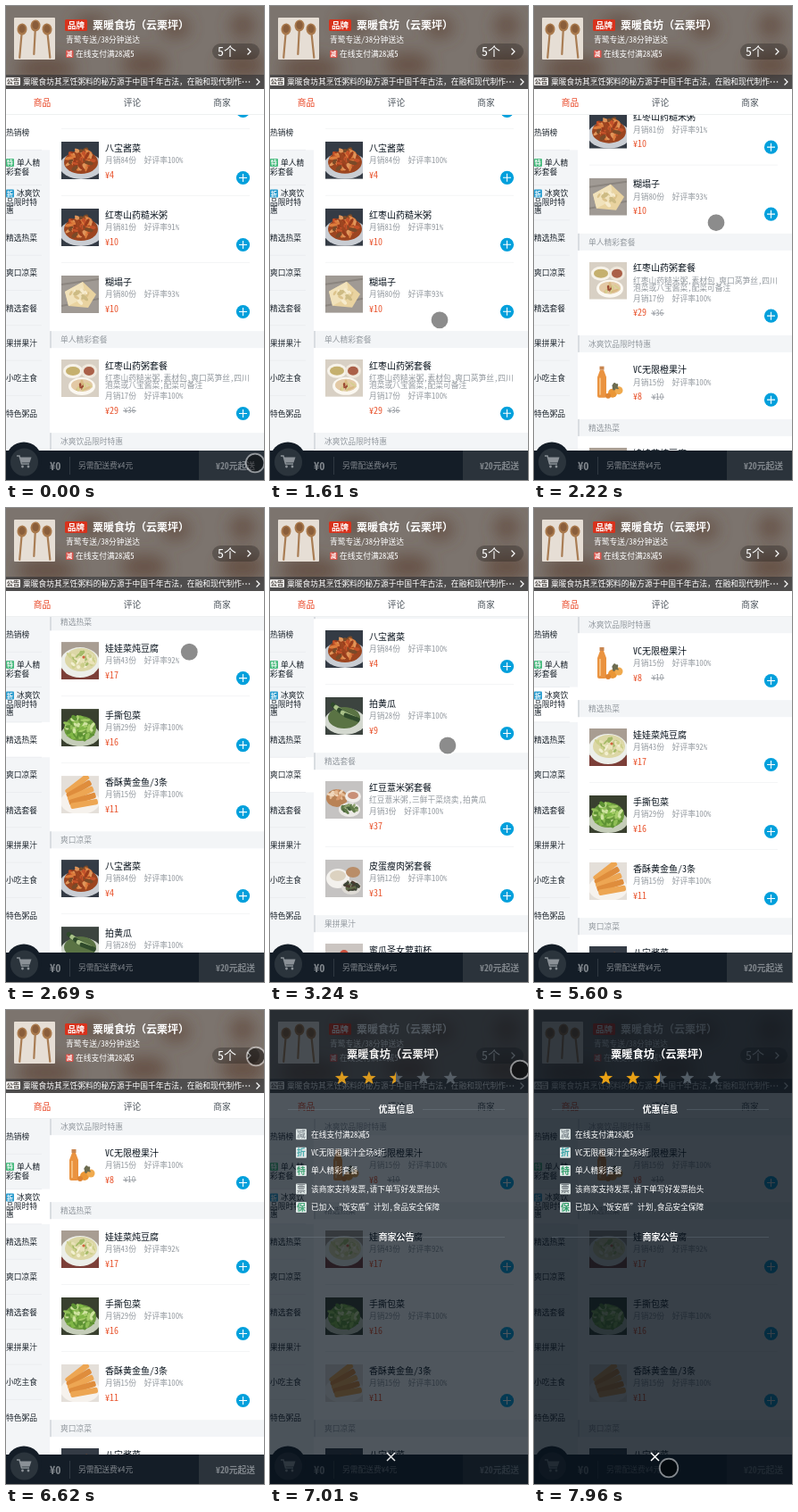
An HTML page for the animation above (8 s loop, 289 by 531 pixels).

```html
<!DOCTYPE html>
<html lang="zh">
<head>
<meta charset="utf-8">
<title>外卖点餐</title>
<style>
html, body { margin: 0; width: 100%; height: 100%; overflow: hidden; background: #fff; }
svg { display: block; }
text { white-space: pre; font-family: "Noto Sans Mono CJK SC", "Noto Sans CJK SC", "Noto Sans CJK", sans-serif; }
</style>
</head>
<body>
<svg id="stage" width="289" height="531" viewBox="0 0 289 531"></svg>
<script>
const LOOP = 8000;
const SMALL = 8.75;
const SHOP = '粟暖食坊（云栗坪）';

// Drawing helpers; text is placed by its vertical centre
const text = (x, y, size, fill, str, extra = '') =>
  `<text x="${x}" y="${y + size * 0.37}" font-size="${size}" fill="${fill}" ${extra}>${str}</text>`;
const rect = (x, y, w, h, fill, extra = '') =>
  `<rect x="${x}" y="${y}" width="${w}" height="${h}" fill="${fill}" ${extra}/>`;
const disc = (x, y, r, fill, extra = '') =>
  `<circle cx="${x}" cy="${y}" r="${r}" fill="${fill}" ${extra}/>`;
const line = (d, stroke, w = 1, extra = '') =>
  `<path d="${d}" fill="none" stroke="${stroke}" stroke-width="${w}" ${extra}/>`;
const oval = (x, y, rx, ry, fill, extra = '') =>
  `<ellipse cx="${x}" cy="${y}" rx="${rx}" ry="${ry}" fill="${fill}" ${extra}/>`;
const BOLD = 'font-weight="700"';
const MEDIUM = 'font-weight="500"';
const MID = 'text-anchor="middle"';

function tag(x, y, size, fill, str, ink = '#fff') {
  return rect(x, y, size, size, fill, 'rx="1"') +
    text(x + size / 2, y + size / 2, size - 2.2, ink, str, `${MID} ${BOLD}`);
}

function random(seed) {
  return () => (seed = (seed * 16807) % 2147483647) / 2147483647;
}

// A heap of food pieces around (cx, cy)
function heap(cx, cy, rx, ry, colors, count, seed) {
  const rnd = random(seed);
  let out = '';
  for (let i = 0; i < count; i++) {
    const a = rnd() * 6.283, d = Math.sqrt(rnd());
    const x = cx + rx * d * Math.cos(a), y = cy + ry * d * Math.sin(a);
    out += oval(x, y, 2 + rnd() * 3, 1 + rnd() * 1.4, colors[i % colors.length],
      `transform="rotate(${rnd() * 180} ${x} ${y})"`);
  }
  return out;
}

// 42 x 42 dish pictures
const pictures = {
  pickle: () => rect(0, 0, 42, 42, '#343b45') + oval(22, 27, 24, 15, '#c9cdd3') + oval(22, 23, 19, 13, '#9c4520') +
    heap(22, 20, 15, 11, ['#c4522a', '#dd7c3c', '#9a3c1c', '#e0955a', '#7a4a28'], 52, 11),
  pancake: () => rect(0, 0, 42, 42, '#a09a94') + line('M0 34 42 26M0 10 42 4', '#8b857f', 2) +
    '<path d="M4 18 24 7 39 21 30 36 8 34Z" fill="#e9d3a0"/><path d="M4 18 24 7 27 24 8 34Z" fill="#f1e2bb"/>' +
    heap(20, 22, 11, 8, ['#dcc38c', '#cdbb84', '#f6ebcd'], 12, 5),
  porridge: () => rect(0, 0, 42, 42, '#d8d0c4') + oval(13, 13, 11, 8, '#f7f3ea') + oval(13, 13, 8, 5, '#c5b06e') +
    oval(31, 13, 9, 8, '#efe8dc') + oval(31, 13, 6, 5, '#aa6048') + oval(23, 30, 15, 10, '#fbf8f1') +
    oval(23, 29, 12, 7, '#e3c9a5') + heap(23, 29, 9, 5, ['#9c4a34', '#d9b982', '#d6cf90'], 12, 8),
  juice: () => rect(0, 0, 42, 42, '#fff') + rect(11.5, 3, 5, 4, '#c98650') +
    '<path d="M12 7h4l3 8v21q0 2-2 2h-6q-2 0-2-2V15Z" fill="#ea9340"/>' + rect(11, 16, 2, 19, '#f5bb7a') +
    disc(26, 33, 5, '#ea9636') + disc(33, 30, 4.5, '#f0aa4e') + disc(21, 36, 3, '#de8433') +
    heap(28, 25, 4, 2.5, ['#6d6c50', '#5a625c'], 5, 3),
  tofu: () => rect(0, 0, 42, 42, '#a89d92') + rect(0, 30, 42, 12, '#7c3f38') + oval(21, 23, 22, 17, '#eceee9') +
    oval(22, 20, 18, 13, '#dcd7a6') +
    heap(22, 20, 15, 9, ['#f2efd0', '#cdcf8c', '#e9e2b8', '#a5ba68'], 30, 21) + disc(25, 17, 1.6, '#d0633f'),
  cabbage: () => rect(0, 0, 42, 42, '#39402f') + oval(21, 29, 22, 13, '#c5cdb9') + oval(21, 22, 18, 14, '#6d9b3e') +
    heap(21, 21, 16, 13, ['#7fb645', '#a5cc68', '#cfe3a0', '#5d9233', '#8fbe56'], 60, 31),
  fish: () => rect(0, 0, 42, 42, '#e4dfd9') + oval(21, 29, 22, 14, '#f6f2ed') +
    [0, 1, 2, 3, 4].map(i => rect(2 + i * 2, 6 + i * 5.5, 31, 6.5, i % 2 ? '#df8d3c' : '#eda653',
      `rx="2" transform="rotate(${-38 + i * 7} ${18 + i * 2} ${9 + i * 5.5})"`)).join(''),
  cucumber: () => rect(0, 0, 42, 42, '#3c443f') + oval(22, 27, 23, 15, '#d3d8cf') + oval(21, 23, 18, 12, '#5a7344') +
    [0, 1, 2, 3, 4].map(i => rect(4 + i * 4, 10 + i * 2.5, 19, 5, i % 2 ? '#a9c188' : '#2f4a2b',
      `rx="2" transform="rotate(${40 - i * 5} ${13 + i * 4} ${13 + i * 2.5})"`)).join(''),
  combo: () => rect(0, 0, 42, 42, '#c5c3c2') + oval(13, 19, 12, 10, '#b98255') + heap(13, 15, 8, 5, ['#e5bb94', '#d79b70', '#efd6bb'], 14, 51) +
    oval(31, 17, 9, 7, '#f1eeea') + oval(31, 16, 6, 4, '#c98f76') +
    oval(27, 32, 12, 8, '#eceae6') + heap(27, 31, 8, 4, ['#5f7a48', '#8a9f6a', '#46603a'], 14, 52),
  congee: () => rect(0, 0, 42, 42, '#c5c3c2') + oval(14, 21, 13, 11, '#f3f1ed') + oval(14, 18, 9, 6, '#dcd2c0') +
    oval(31, 14, 8, 6, '#b98d68') + oval(29, 31, 11, 8, '#dedbd5') +
    heap(29, 30, 8, 5, ['#3d4436', '#5f6a48', '#4d3c30'], 16, 53),
  melon: () => rect(0, 0, 42, 42, '#cbc5c1') + '<path d="M10 14H32L27 40H15Z" fill="#ecdccd"/>' +
    '<path d="M12 20H30L26 38H16Z" fill="#e8b183"/>' + heap(21, 15, 9, 5, ['#e2a070', '#eccaa4', '#dd8660'], 16, 61) +
    disc(21, 12, 5, '#c9513f') + disc(21, 12, 2, '#e08a6c'),
  can: () => rect(0, 0, 42, 42, '#c6bfba') + rect(11, 10, 21, 28, '#a8342c', 'rx="3"') +
    rect(14, 15, 4, 20, '#cf6555') + rect(12, 6, 19, 6, '#5e3a34', 'rx="2"')
};

// Menu content in order; positions are derived from the row heights
const rows = [
  { name: '小米粥', sold: 90, rate: 95, price: 3, pic: 'congee' },
  { name: '八宝酱菜', sold: 84, rate: 100, price: 4, pic: 'pickle' },
  { name: '红枣山药糙米粥', sold: 81, rate: 91, price: 10, pic: 'pickle' },
  { name: '糊塌子', sold: 80, rate: 93, price: 10, pic: 'pancake' },
  { head: '单人精彩套餐' },
  { name: '红枣山药粥套餐', sold: 17, rate: 100, price: 29, old: 36, pic: 'porridge',
    desc: ['红枣山药糙米粥,素材包,爽口莴笋丝,四川', '泡菜或八宝酱菜,配菜可备注'] },
  { head: '冰爽饮品限时特惠' },
  { name: 'VC无限橙果汁', sold: 15, rate: 100, price: 8, old: 10, pic: 'juice' },
  { head: '精选热菜' },
  { name: '娃娃菜炖豆腐', sold: 43, rate: 92, price: 17, pic: 'tofu' },
  { name: '手撕包菜', sold: 29, rate: 100, price: 16, pic: 'cabbage' },
  { name: '香酥黄金鱼/3条', sold: 15, rate: 100, price: 11, pic: 'fish' },
  { head: '爽口凉菜' },
  { name: '八宝酱菜', sold: 84, rate: 100, price: 4, pic: 'pickle' },
  { name: '拍黄瓜', sold: 28, rate: 100, price: 9, pic: 'cucumber' },
  { head: '精选套餐' },
  { name: '红豆薏米粥套餐', sold: 3, rate: 100, price: 37, pic: 'combo', desc: ['红豆薏米粥,三鲜干菜烧卖,拍黄瓜'] },
  { name: '皮蛋瘦肉粥套餐', sold: 12, rate: 100, price: 31, pic: 'congee' },
  { head: '果拼果汁' },
  { name: '蜜瓜圣女萝莉杯', sold: 1, rate: '', price: 6, pic: 'melon' },
  { name: '禾润清', sold: 7, rate: 100, price: 6, pic: 'can' },
  { name: '鲜橙汁', sold: 5, rate: 100, price: 8, pic: 'juice' }
];

const headTops = [];
const descHeight = row => [0, 13, 20][(row.desc || []).length];

function dish(y, d, last) {
  const low = y + descHeight(d);
  return `<svg x="62" y="${y - 7}" width="42" height="42">${pictures[d.pic]()}</svg>` +
    text(111, y, 10, '#07111b', d.name) +
    (d.desc || []).map((s, i) => text(111, y + 14 + i * 8, SMALL, '#93999f', s)).join('') +
    text(111, low + 14, SMALL, '#93999f', `月销${d.sold}份  好评率${d.rate}%`) +
    text(111, low + 30, 10, '#e8512a', '¥' + d.price, MEDIUM) +
    (d.old ? text(132, low + 30, SMALL, '#93999f', '¥' + d.old) + line(`M131 ${low + 30.5}h15`, '#93999f', 0.8) : '') +
    disc(265.5, low + 33.5, 7.6, '#00a0dc') +
    line(`M261 ${low + 33.5}h9m-4.5 -4.5v9`, '#fff', 1.1) +
    (last ? '' : line(`M62 ${low + 53.5}H273`, '#f4f5f6'));
}

function buildList() {
  let y = -273, out = '';
  rows.forEach((row, i) => {
    if (row.head) {
      headTops.push(y - 9.5);
      out += rect(49, y - 9.5, 240, 19, '#f3f5f7') + rect(49, y - 9.5, 2, 19, '#d9dde1') +
        text(61, y, SMALL, '#93999f', row.head);
      y += 29.3;
    } else {
      const last = !rows[i + 1] || !!rows[i + 1].head;
      out += dish(y, row, last);
      y += (last ? 64.7 : 75) + descHeight(row);
    }
  });
  return out;
}

const MENU_STEP = 39.3;
function buildMenu() {
  const ink = '#1c242c';
  const names = ['热销榜', '', '', '精选热菜', '爽口凉菜', '精选套餐', '果拼果汁', '小吃主食', '特色粥品'];
  let out = '';
  names.forEach((name, i) => {
    const y = 122 + MENU_STEP * i;
    out += text(0, y + 20, SMALL, ink, name);
    if (i) out += line(`M0 ${y}H40`, '#ebedf0');
  });
  return out + tag(0, 171, 9, '#45b97c', '特') + text(12, 175.5, SMALL, ink, '单人精') + text(0, 186, SMALL, ink, '彩套餐') +
    tag(0, 205.5, 9, '#2f9fd0', '折') + text(12, 210, SMALL, ink, '冰爽饮') +
    text(0, 219.5, SMALL, ink, '品限时特') + text(0, 229, SMALL, ink, '惠');
}

function spoon(x, y, turn) {
  return `<g transform="translate(${x} ${y}) rotate(${turn})">` + rect(-1.1, 4, 2.2, 29, '#a97d54', 'rx="1"') +
    oval(0, 0, 5.5, 6.5, '#a9794c') + oval(0, -0.5, 3.6, 4.6, '#8a5e3b') + '</g>';
}

// The shop photo, enlarged and blurred
function backdrop() {
  const spots = [[45, 70, 34, 14], [155, 66, 26, 14], [190, 24, 16, 12], [265, 66, 26, 16], [265, 22, 14, 14], [95, 20, 20, 10]];
  return rect(0, 0, 289, 93, '#7c746e') + '<g filter="url(#blur)">' +
    spots.map(([x, y, rx, ry]) => oval(x, y, rx, ry, '#5f4838', 'opacity=".75"')).join('') + '</g>';
}

function buildHeader() {
  const w = '#fff';
  return `<svg width="289" height="93">${backdrop()}</svg>` +
    '<svg x="9" y="13" width="46" height="47">' + rect(0, 0, 46, 47, '#e6ded5', 'rx="1"') +
    spoon(9, 13, 5) + spoon(24, 9, 3) + spoon(37, 13, -6) + '</svg>' +
    rect(66, 15, 25, 13, '#d8321c', 'rx="1.5"') + text(78.5, 21.5, 9.5, w, '品牌', `${MID} ${BOLD}`) +
    text(97, 22, 12, w, SHOP, BOLD) +
    text(67, 38, SMALL, w, '青鹭专送/38分钟送达', MEDIUM) +
    tag(67, 49.5, 8.5, '#d9534a', '减') + text(78, 54, SMALL, w, '在线支付满28减5', MEDIUM) +
    rect(231, 42, 53, 18, 'rgba(0,0,0,.25)', 'rx="9"') + text(237, 51, 14, w, '5个') +
    line('M270.5 47.5l3.5 3.5-3.5 3.5', w, 1.2) +
    rect(0, 77, 289, 16, 'rgba(7,17,27,.38)') + rect(0, 80, 16, 9, '#f0eeec', 'rx="1"') +
    text(8, 84.5, 7.2, '#4b4643', '公告', `${MID} ${BOLD}`) +
    text(19, 85, SMALL, w, SHOP.slice(0, 4) + '其烹饪粥料的秘方源于中国千年古法，在融和现代制作', MEDIUM) +
    [265.5, 269, 272.5].map(x => disc(x, 85, 0.8, w)).join('') +
    line('M280.5 81.5l3.5 3.5-3.5 3.5', w, 1.2) +
    rect(0, 93, 289, 29, '#fff') + line('M0 121.5H289', '#eef0f1') +
    [['商品', 40.5, '#e8401f'], ['评论', 141.5, '#4d555d'], ['商家', 242, '#4d555d']]
      .map(([s, x, c]) => text(x, 108, 9.7, c, s, MID)).join('');
}

function buildBar() {
  return rect(0, 498, 289, 33, '#141d27') + disc(20, 508.5, 20, '#141d27') + disc(20.5, 511, 15.5, '#2b343c') +
    line('M12 504h3l2.5 9h8.5', '#8b9197', 1.5) + '<path d="M15.5 505.500H28.5L26.5 511.5H17.5Z" fill="#8b9197"/>' +
    disc(18.5, 516, 1.4, '#8b9197') + disc(25, 516, 1.4, '#8b9197') +
    text(49, 515, 12.5, '#80868c', '¥0', BOLD) + line('M71.5 505V525', '#303941') +
    text(81, 515, SMALL, '#80868c', '另需配送费¥4元') +
    rect(216, 498, 73, 33, '#2b333b') + text(235, 515, 9.8, '#80868c', '¥20元起送', BOLD);
}

function star(x, y, fill) {
  let pts = '';
  for (let i = 0; i < 10; i++) {
    const r = i % 2 ? 3.4 : 8, a = i * Math.PI / 5;
    pts += `${x + r * Math.sin(a)},${y - r * Math.cos(a)} `;
  }
  return `<polygon points="${pts}" fill="${fill}"/>`;
}

function buildSheet() {
  const w = '#fff', gold = '#e9a115', dim = '#525c65';
  const heading = (y, s) => line(`M20 ${y + 0.5}H112M171 ${y + 0.5}H263`, '#4b555e') +
    text(141.5, y, 10, w, s, `${MID} ${BOLD}`);
  const offers = [
    ['减', '#7f8a90', '在线支付满28减5'],
    ['折', '#35a3a5', 'VC无限橙果汁全场8折'],
    ['特', '#32a06c', '单人精彩套餐'],
    ['票', '#6f777d', '该商家支持发票,请下单写好发票抬头'],
    ['保', '#32a06c', '已加入“饭安盾”计划,食品安全保障']
  ];
  return rect(0, 0, 289, 531, 'rgba(7,17,27,.8)') + text(86, 49, 12.25, w, SHOP, BOLD) +
    [gold, gold, 'url(#half)', dim, dim].map((c, i) => star(80.5 + i * 30.4, 76.5, c)).join('') +
    heading(111, '优惠信息') +
    offers.map(([s, c, label], i) => {
      const y = 139.3 + i * 20.4;
      return tag(29, y - 6, 12, '#dbe4e3', s, c) + text(46, y, SMALL, w, label, MEDIUM);
    }).join('') +
    heading(254, '商家公告') + line('M131 496l9 9m0-9l-9 9', w, 1.5);
}

const stage = document.getElementById('stage');
stage.innerHTML = `<defs>
  <linearGradient id="half"><stop offset=".5" stop-color="#e9a115"/><stop offset=".5" stop-color="#525c65"/></linearGradient>
  <filter id="blur" x="-20%" y="-60%" width="140%" height="220%"><feGaussianBlur stdDeviation="9"/></filter>
  <clipPath id="body"><rect y="122" width="289" height="376"/></clipPath></defs>
  ${rect(0, 0, 289, 531, '#fff')}
  <g clip-path="url(#body)"><g id="list">${buildList()}</g></g>
  ${rect(0, 122, 49, 376, '#f3f5f7')}${rect(0, 122, 49, MENU_STEP, '#fff', 'id="active"')}
  ${buildMenu()}${buildHeader()}${buildBar()}
  <g id="sheet">${buildSheet()}</g>
  <g id="cursor">${disc(0, 0, 9.5, 'rgba(0,0,0,.45)')}
    ${disc(0, 0, 10.3, 'none', 'stroke="#fff" stroke-opacity=".5" stroke-width="1.8"')}</g>`;

const [list, active, sheet, cursor] = ['list', 'active', 'sheet', 'cursor'].map(id => document.getElementById(id));

const clamp = v => Math.max(0, Math.min(1, v));
const linear = u => u;
const quadOut = u => 1 - (1 - u) ** 2;
const cubicOut = u => 1 - (1 - u) ** 3;
const smooth = u => u * u * (3 - 2 * u);

// Keys are [time, easing into the key, ...values]
function follow(keys, t) {
  const i = keys.findIndex(k => k[0] > t);
  if (i === 0) return keys[0].slice(2);
  if (i < 0) return keys[keys.length - 1].slice(2);
  const a = keys[i - 1], b = keys[i];
  const u = b[1]((t - a[0]) / (b[0] - a[0]));
  return a.slice(2).map((v, k) => v + (b[k + 2] - v) * u);
}

const scrollKeys = [
  [1610, linear, -357], [2220, linear, -248], [2460, linear, -165], [3240, quadOut, 354],
  [4200, linear, 354], [4530, cubicOut, 508], [4890, linear, 508], [5320, cubicOut, 0]
];
const pathKeys = [
  [0, linear, 279, 512], [70, linear, 279, 512], [830, linear, 256, 464],
  [1250, smooth, 158, 320], [1400, smooth, 165, 300], [1610, smooth, 190, 352],
  [2220, linear, 204, 243], [2460, linear, 206, 160], [2560, linear, 206, 150],
  [3240, smooth, 199, 266], [3390, linear, 191, 268], [4030, smooth, 21, 354],
  [4270, linear, 23, 343], [4380, linear, 23, 343], [4730, smooth, 20, 217],
  [5040, linear, 20, 217], [5560, smooth, 305, 225], [5980, linear, 283, 214],
  [6620, smooth, 280, 52], [6850, smooth, 280, 67], [7050, linear, 280, 67],
  [7630, smooth, 208, 409], [7960, smooth, 151, 513]
];

function draw(t) {
  const [scroll] = follow(scrollKeys, t);
  list.setAttribute('transform', `translate(0 ${-scroll})`);
  const index = headTops.filter(top => top - scroll <= 122.5).length;
  active.setAttribute('y', 122 + MENU_STEP * index);

  const fade = quadOut(clamp((t - 6780) / 350));
  sheet.setAttribute('opacity', fade);

  const [x, y] = follow(pathKeys, t);
  cursor.setAttribute('transform', `translate(${x} ${y})`);
  const shown = t < 70 || (t >= 830 && t < 5560) || t >= 5980;
  cursor.setAttribute('visibility', shown ? 'visible' : 'hidden');
}

const start = performance.now();
function tick() {
  draw((performance.now() - start) % LOOP);
  requestAnimationFrame(tick);
}
draw(0);
requestAnimationFrame(tick);
</script>
</body>
</html>
```
